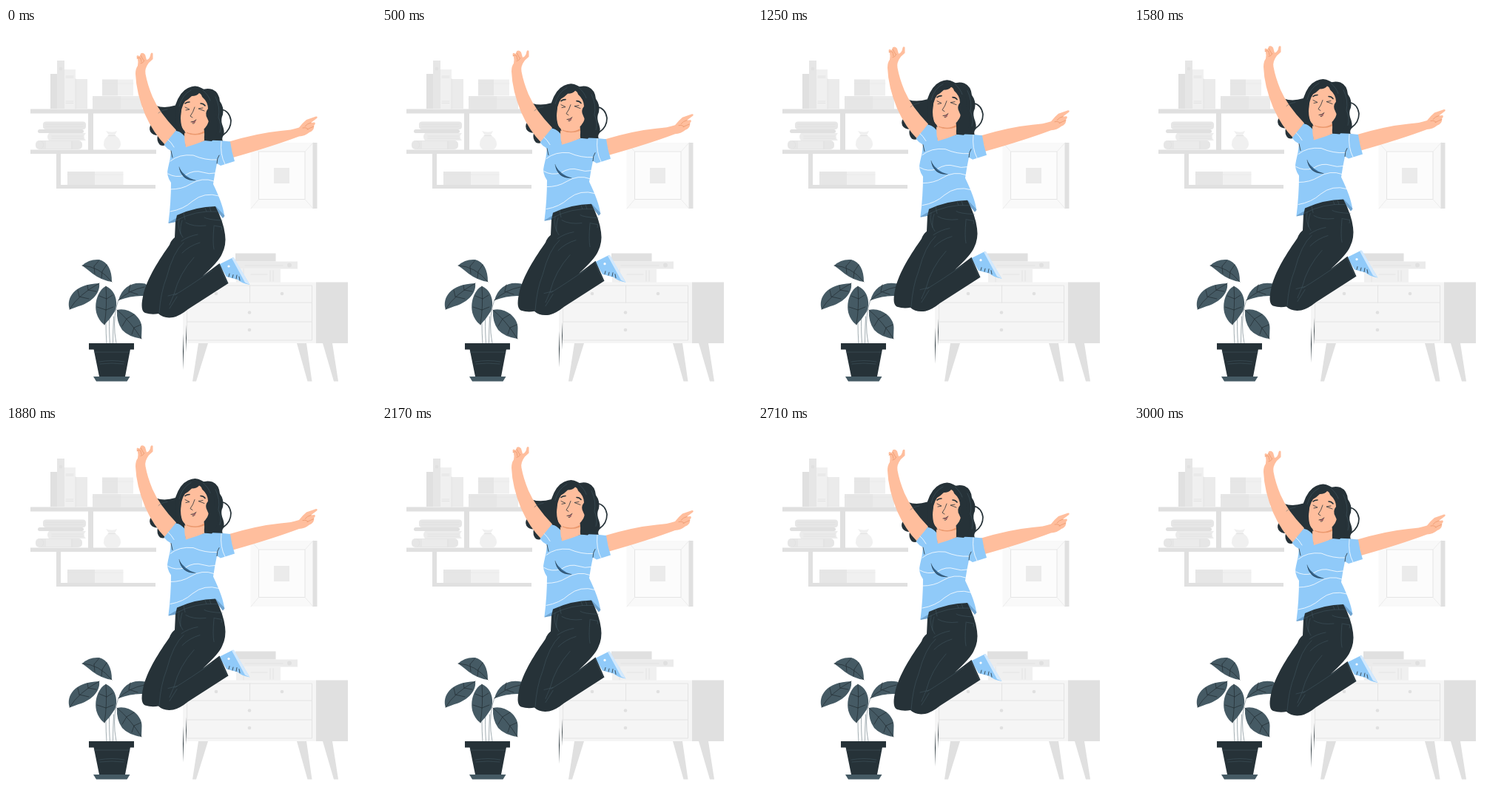
An HTML page for the animation above (3.04 s loop, 500 by 500 pixels).

```html
<!DOCTYPE html>
<html lang="en">
<head>
<meta charset="utf-8">
<title>Jumping for joy</title>
<style>
  html, body { margin: 0; width: 100%; height: 100%; overflow: hidden; background: #fff; }
  svg { display: block; width: 100vw; height: 100vh; }
  .g1 { fill: #e0e0e0; } .g2 { fill: #e6e6e6; } .g3 { fill: #ebebeb; }
  .g4 { fill: #f0f0f0; } .g5 { fill: #f5f5f5; }
  .dark { fill: #263238; } .leaf { fill: #455a64; }
  .skin { fill: #ffbe9d; } .blue { fill: #90caf9; }
  .line { fill: none; stroke-width: .8; stroke-linecap: round; stroke-linejoin: round; }
  .thin { stroke-width: .5; }
  .ink { stroke: #263238; } .seam { stroke: #455a64; } .pale { stroke: #e0e0e0; }
  .white { stroke: #fff; } .fold { stroke: #eb996e; }
</style>
</head>
<body>
<svg viewBox="0 0 500 500">
  <g id="shelves">
    <path class="g1" d="M60 62h9.500v47H60z"/>
    <path class="g2" d="M69 44h10v65H69z"/>
    <path class="g4" d="M79 56h15v53H79z"/>
    <path class="g3" d="M94 69h16v40H94z"/>
    <circle class="g1" cx="74" cy="55" r="2.300"/>
    <path class="line pale" d="M81 65h10M81 67h10M81 99h10M81 101.500h10M94 69v40"/>
    <path class="g2" d="M130 69.500h21v22h-21zM117 92h38v17.500h-38z"/>
    <path class="g4" d="M151 69.500h21v22h-21z"/>
    <path class="g3" d="M155 92h29v17.500h-29z"/>
    <path class="line pale thin" d="M130 75h42M117 96h66"/>

    <rect class="g2" x="50" y="126.500" width="58" height="10.500" rx="4"/>
    <rect class="g1" x="43" y="137" width="62" height="5" rx="2.500"/>
    <path class="g3" d="M58 142h50q-5 5 0 10H58q-4-5 0-10z"/>
    <rect class="g2" x="40" y="152" width="63" height="12" rx="5"/>
    <rect class="g3" x="54" y="153" width="34" height="10"/>
    <path class="line pale" d="M54 130h50M54 133h50M62 146h42M62 149h42M48 153q6 5 0 10M89 153v10"/>
    <path class="g4" d="M135 139q8 3 15 0l-3 6q8 4 8 12 0 4-4 7h-15q-4-3-4-7 0-8 7-12z"/>
    <path class="line pale" d="M138 145.500h10"/>

    <path class="g2" d="M83 194h37v18H83z"/>
    <path class="g4" d="M120 194h38.500v18H120z"/>
    <path class="line pale thin" d="M83 198h75"/>
    <path class="g1" d="M33 109.500h170v6H33zM33 164.500h170v5.500H33zM68 212h134v5H68zM111 115h7v50h-7zM68 170h6v47h-6z"/>
  </g>

  <g id="picture">
    <path fill="#f9f9f9" d="M330.500 155H415v89h-84.500z"/>
    <path class="g1" d="M414.500 155h6v89h-6z"/>
    <path fill="#fcfcfc" stroke="#e0e0e0" stroke-width=".8" d="M341.500 167H404v64.500h-62.500z"/>
    <path class="line" stroke="#e9e9e9" d="M331 155l10.500 12M415 155l-11 12M331 244l10.500-12.500M415 244l-11-12.500"/>
    <path class="g3" d="M362 189h21v21h-21z"/>
  </g>

  <g id="cabinet">
    <path class="g1" d="M310 304.500h54.500v11H310z"/>
    <path class="g3" d="M311 315.500h83v10h-83z"/>
    <path class="g4" d="M311 325.500h60V344h-60z"/>
    <circle class="g1" cx="383" cy="320.500" r="3"/>
    <path class="line pale" d="M323 321h51M321 325.500v18M357 328v14M361 328v14M331 333h22"/>
    <path class="g1" d="M260 426h13l-16 51.500h-5zM393 426h13l7.500 51.500h-6zM428 426h13l8 51.500h-6z"/>
    <path class="g5" d="M239 343.500h180V426H239z"/>
    <path class="g1" d="M419 343.500h43V426h-43z"/>
    <path class="line pale" d="M245 348h168.500v74H245zM245 371h168.500M245 397h168.500M329.500 348v23"/>
    <g class="g1">
      <circle cx="284" cy="359" r="2.300"/><circle cx="373" cy="359" r="2.300"/>
      <circle cx="329" cy="384.500" r="2.300"/><circle cx="329" cy="408" r="2.300"/>
    </g>
  </g>

  <g id="plant">
    <path class="line seam thin" d="M135 399q0 14 1 27M139.500 394q0 20 1 32M145.500 390q-1 20-1 36M152 367q-7 20-5 45 1 8 2 14"/>
    <g class="leaf">
      <path d="M103 321Q112 312 126 313 143 318 143 343 129 341 117 332 111 327 103 321z"/>
      <path d="M86 380.500C81 365 92 346 126 345 128 360 113 372 98 376 91 377 86 380.500z"/>
      <path d="M152 368C157 349 172 342 188 345.500L195 351 187 362Q170 361 152 368z"/>
      <path d="M150 381C165 377 184 390 183.500 406L183 420Q165 417 157 408 149 397 150 381z"/>
      <path d="M135 349C148 354 152 371 147 383Q141 393 133 401 128 398 124 390C117 375 124 354 135 349z"/>
    </g>
    <path class="line ink" d="M103 321Q126 322 143 343M119 322l6-7M119 322l1 10M130 329l6-9M130 329l-1 9
      M86 380Q98 360 126 345M99 363l-2-9M99 363l13 3M111 354l-1-6M111 354l11 2
      M152 368Q166 354 187 350M166 356l2-9M166 356l12 4
      M150 381Q168 396 183 420M163 393l10-6M163 393l-6 10M173 405l9-4M173 405l-3 9
      M135 349Q137 375 133 401M136 366l8-5M136 366l-10-4M135 381l10-4M135 381l-12-4"/>
    <path class="dark" d="M112 426h61v8.500h-61zM118.500 434h49.500l-7 37h-35z"/>
    <path class="leaf" d="M118 471h49.500l-4 6.500H122z"/>
    <path class="line seam thin" d="M119 438h48M126 451q17-3 34 0M127 454q16-2 32 0"/>
  </g>

  <g id="jumper">
    <path class="dark" d="M239.500 413l.5 24-.5 25-.5-25zM243.500 401l.4 18-.4 19-.4-19z"/>

    <g id="hair-back">
      <path class="dark" d="M240 92Q236 103 229 104.500 214 109 203 105L199 128Q192 133 195 140 198 145 205 145 203 153 208 158 214 161 220 155L244 162V100z"/>
      <path class="dark" d="M262 85Q270 80 279 83 288 87 289 99 295 107 293 117 290 123 292 130 296 140 294 145 291 149 293 153L262 154z"/>
      <path class="line ink" style="stroke-width:1.700" d="M291 110Q302 112 304 125 304 137 294 144"/>
    </g>

    <g id="left-arm">
      <path class="skin" d="M178 51Q179 46 178 42L176.500 39.500 177 37 181 38 182 34.500Q185 32.500 188 36L190 43Q194.500 42 195.500 35 197 32.500 198.500 34.500L198.500 42 193 47Q187 55 188.500 62 191 76 198 93 207 114 230 138L216 159Q199 142 188 117 176 88 175 62 175 55 178 51z"/>
      <path class="line fold" d="M177 41q3-2 5 0l1 5M182 37l4 7M182 48q3 0 5-4"/>
    </g>

    <g id="right-arm">
      <path class="skin" d="M300 154Q340 142 371 139 386 138 396 134.500 401 128 406 124L419 119.500Q422 120 420 122L412 128 417 127.500Q419 129 416 132L416 135Q415 139 410 141 404 146 396 146.500 360 160 305 175.500z"/>
      <path class="line fold" d="M412 128q-5 1-8 5M416 133q-5 2-9 4M401 135q6-1 7 2"/>
    </g>

    <g id="shirt">
      <path fill="#6fa3cf" d="M222 252L219.500 264 230 262 236 250zM278 238L293 257 295.500 254 286 232z"/>
      <path class="blue" d="M230 138L213.500 158Q217 163 223 166 222 178 219 189 216 199 223 209 223 235 219.500 263L240 251 263 244 284 241.500 295 253Q293 238 280 211 282 197 285 183L290 186 309 180Q305 168 303 153.500 286 151 269 152L243 160 242 147Q237 141 230 138z"/>
      <path class="line white" d="M219 151q4 3 8 10M222 180q12-10 31-8 16 7 32 6M219 197q10 6 23 2 12-8 24-4 8 3 17 1M222 218q16 0 27-7 16-10 32-4M222 248q18-3 30-14 16-13 36-7M291 153q-2 18 5 31"/>
      <path class="line ink" d="M223 166l2 9M285 183q0-7 3-11"/>
      <path fill="#37658c" d="M234 189Q238 207 256 206 242 202 234 189z"/>
      <path class="line ink thin" d="M234 188Q237 206 256 206"/>
    </g>

    <g id="legs">
      <path class="blue" d="M288 319.500L307 310 329.500 347Q318 345 313 340L298 336z"/>
      <path fill="#d3e9fd" d="M305 311l3-1 21.500 37-6.500-3z"/>
      <circle fill="#fff" cx="301" cy="322" r="1.600"/>
      <path class="line ink" d="M301 336l1-4M306 337.500l1-4M311 339l1-5M316 341l-1-5"/>
      <path class="dark" d="M229 262L228 283Q223 287 221 293C208 312 190 338 185 363Q181 382 188 385 197 388 206 386 213 393 226 391 235 389 246 380L300.500 345 288.500 318 266 335Q288 315 292 305 298 293 296 279 294 262 283 241 256 241.500 231 253z"/>
      <path class="line seam thin" d="M230 260Q256 246 285 248M240 250l2 9M269 243l2 5M275 242l2 6M234 258q-3 14 5 25M238 260q-3 8-2 18M243 263q10 6 27 4M268 256q4 3 24 4M281 267l11 2-1 4M281 268q-2 22 0 31M240 290q-14 12-23 47-8 20-10 48M259 279q-12 2-22 9M262 290q-14 4-24 14M254 310q-20 22-27 50l-6 14M228 361q20-12 50-33M231 363l-10 16M219 362l12-3M288 320l11 25"/>
    </g>

    <g id="head">
      <path class="skin" d="M243 129L241 144Q241 153 243 161 257 157 269 152L267 131z"/>
      <path fill="#eb996e" d="M244 139Q255 147 268 139L268 142Q255 147 244 142z"/>
      <path class="skin" d="M242 88Q235 112 236 127 237 140 248 142 261 144 269 135 276 127 275 114 274 98 265 86z"/>
      <path class="dark" d="M229 104Q235 86 246 81 256 76 264 81 270 84 272 86 284 101 281 113 292 140 278 153L268 152Q267 142 272 136 276 129 272 122 268 115 273 109 273 100 265 93 264 89 261 88 258 92 251 92 246 97 242 99 236 107 236 122 236 136 243 142L230 139z"/>
      <path class="line ink" d="M242 107l6 3-5 1M268 112l-8-3 6-1M255 107q-2 7-6 12l3 2"/>
      <path class="line ink" style="stroke-width:1.600" d="M242 102q2-2 6-2M263 102q4 0 6 3"/>
      <path fill="#b16668" d="M250 127q4 0 7-3-1 5-4 4z"/>
      <path class="line ink" d="M250 127q4 0 7-3M252 129q2 1 3-1"/>
      <path class="line seam thin" d="M250 84q-12 6-16 22M266 84q8 7 10 14M283 93q7 14 4 28 5 9 2 20M218 110q-8 1-12 5"/>
    </g>
  </g>
</svg>
<script>
  const LOOP = 3040, RISE = 1500, HEIGHT = 10;
  const jumper = document.getElementById("jumper");

  // Steady rise and fall, with a short rest before the loop restarts.
  function render(now) {
    const t = Math.min(now % LOOP, 2 * RISE);
    const lift = HEIGHT * (1 - Math.abs(t - RISE) / RISE);
    jumper.setAttribute("transform", `translate(0 ${-lift.toFixed(3)})`);
  }

  let start;
  function tick(now) {
    start ??= now;
    render(now - start);
    requestAnimationFrame(tick);
  }
  render(0);
  requestAnimationFrame(tick);
</script>
</body>
</html>
```
